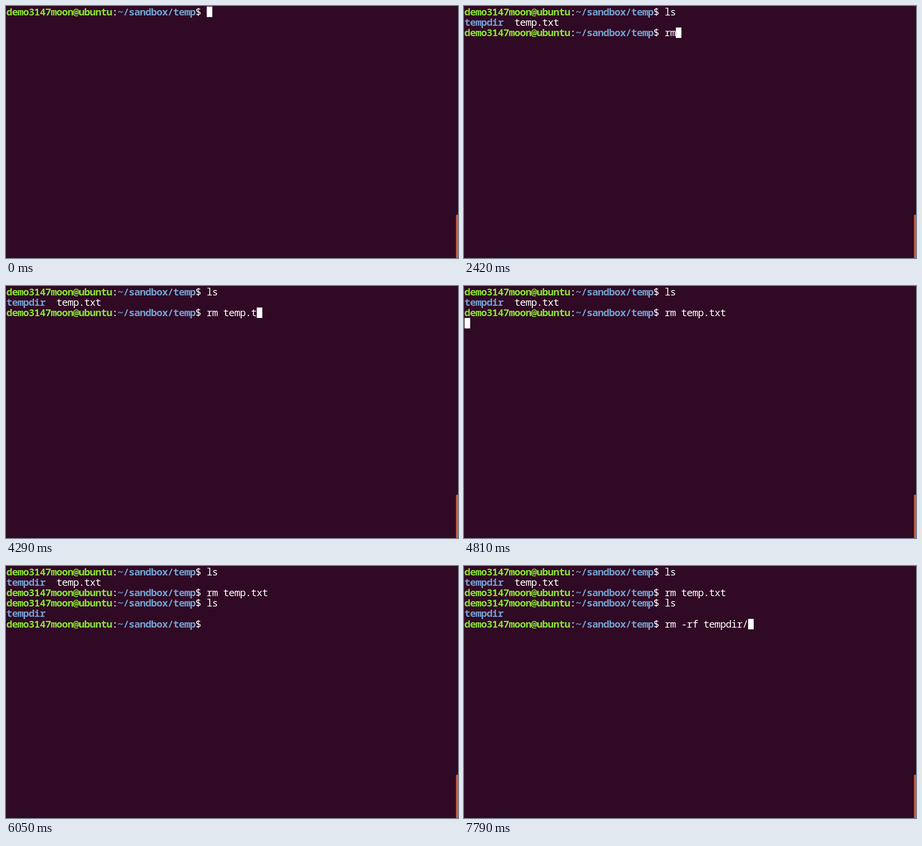
These frames come from a looping animation (1000x560 px, 8000 ms). An HTML page with a canvas:

```html
<!DOCTYPE html>
<html lang="en">
<head>
<meta charset="utf-8">
<title>Terminal session</title>
<style>
  html, body { margin: 0; width: 100%; height: 100%; overflow: hidden; background: #300a24; }
  canvas { display: block; }
</style>
</head>
<body>
<canvas id="screen" width="1000" height="560"></canvas>
<script>
const ctx = document.getElementById('screen').getContext('2d');
const LOOP = 8000, PAD = 1.3, CELL = 12.3, ROW = 23.24, BASELINE = 19.2;
const FONT = '22px "Noto Sans Mono", monospace';

// Style marks inside the output: { user, } directory, | plain
const STYLES = {
  '{': ['#8ae234', 'bold ' + FONT],
  '}': ['#729fcf', 'bold ' + FONT],
  '|': ['#ffffff', FONT]
};
const PROMPT = '{demo3147moon@ubuntu|:}~/sandbox/temp|$ ';

// [time in ms, appended output, cursor shown]
const EVENTS = [
  [0, PROMPT, true],
  [580, 'l', true],
  [690, 's', true],
  [1000, '\n}tempdir|  temp.txt\n' + PROMPT, true],
  [1750, 'r', true],
  [2420, 'm', true],
  [2910, ' ', false],
  [3220, 't', false],
  [3330, 'e', false],
  [3440, 'm', false],
  [3590, 'p', false],
  [3960, '.', true],
  [4290, 't', true],
  [4400, 'x', true],
  [4500, 't', true],
  [4810, '\n', true],
  [4910, PROMPT, true],
  [5820, 'l', true],
  [5930, 's', true],
  [6050, '\n}tempdir|\n' + PROMPT, false],
  [6540, 'r', false],
  [6650, 'm', false],
  [6930, ' -', false],
  [7030, 'r', false],
  [7120, 'f', false],
  [7260, ' ', true],
  [7440, 't', true],
  [7560, 'e', true],
  [7670, 'm', true],
  [7790, 'pdir/', true]
];

function setStyle(mark) {
  [ctx.fillStyle, ctx.font] = STYLES[mark];
}

function drawScrollbar() {
  ctx.fillStyle = '#cb603c';
  ctx.beginPath();
  ctx.roundRect(995.6, 463.8, 6, 98, 2);
  ctx.fill();
}

function drawCursor(col, row) {
  ctx.fillStyle = '#ffffff';
  ctx.fillRect(PAD + col * CELL, PAD + row * ROW, CELL, ROW);
}

function draw(time) {
  const past = EVENTS.filter(([start]) => start <= time);
  const output = past.map(event => event[1]).join('');
  let col = 0, row = 0;

  ctx.fillStyle = '#300a24';
  ctx.fillRect(0, 0, 1000, 560);
  drawScrollbar();
  ctx.textAlign = 'center';
  setStyle('|');
  for (const char of output) {
    if (char in STYLES) {
      setStyle(char);
    } else if (char === '\n') {
      col = 0;
      row++;
    } else {
      ctx.fillText(char, PAD + (col + 0.5) * CELL, PAD + row * ROW + BASELINE);
      col++;
    }
  }
  if (past[past.length - 1][2]) drawCursor(col, row);
}

const begin = performance.now();
function tick() {
  draw((performance.now() - begin) % LOOP);
  requestAnimationFrame(tick);
}
tick();
</script>
</body>
</html>
```
